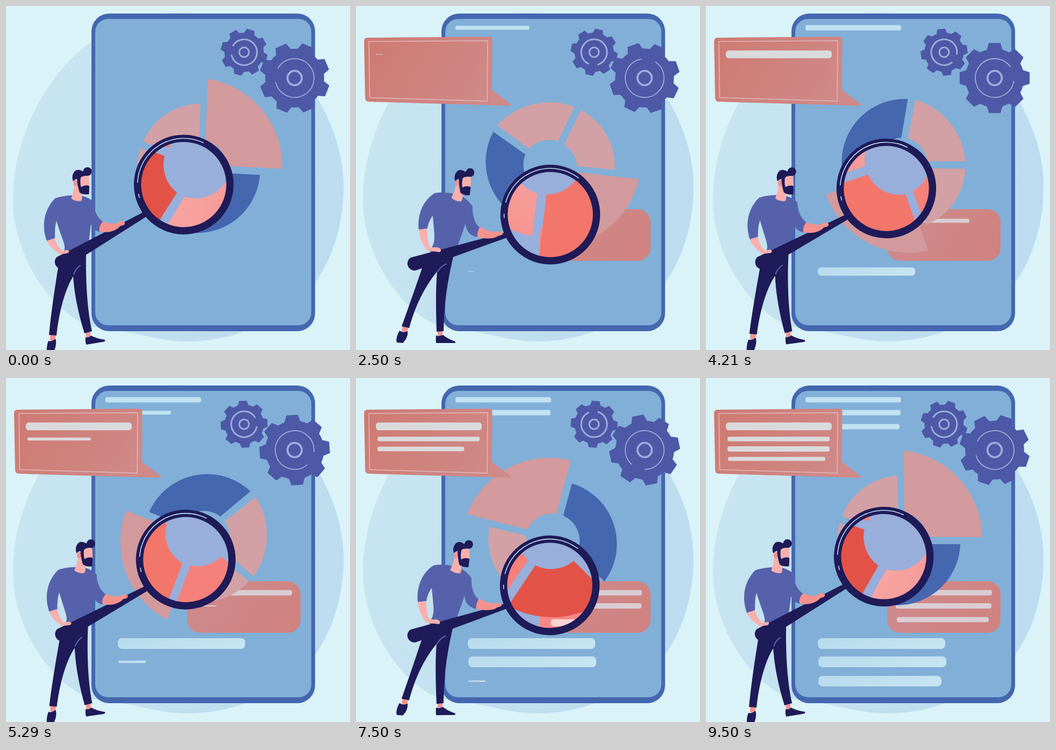
An HTML page that plays this animation: 640 by 640 pixels, repeating every 9.57 s.

```html
<!DOCTYPE html>
<html>
<head>
<meta charset="utf-8">
<style>
  html, body { margin: 0; width: 100%; height: 100%; overflow: hidden; background: #d9f3f8; }
  svg { display: block; width: 100%; height: 100%; }
</style>
</head>
<body>
<svg id="stage" viewBox="0 0 640 640"></svg>
<script>
const LOOP = 9570, GROWN = 2380, REST = LOOP - GROWN;
const NAVY = '#1f1a58', SWEATER = '#5562ab', SKIN = '#f9b0ad', ROSE = '#f5928d', RING = '#9aaedb', GEAR = '#4d58a7';
const ZOOM = 1.286, REACH = 268.4;
const stage = document.getElementById('stage');

const polar = (deg, r) => {
  const a = deg * Math.PI / 180;
  return `${(r * Math.cos(a)).toFixed(2)} ${(r * Math.sin(a)).toFixed(2)}`;
};
const clamp = v => Math.max(0, Math.min(1, v));
const arc = (from, to, r) => `M${polar(from, r)}A${r} ${r} 0 ${to - from > 180 ? 1 : 0} 1 ${polar(to, r)}`;
const path = (d, fill, extra = '') => `<path d="${d}" fill="${fill}" ${extra}/>`;
const line = (d, stroke, width) => path(d, 'none', `stroke="${stroke}" stroke-width="${width}" stroke-linecap="round"`);
const gradient = (id, a, b) => `<linearGradient id="${id}" x2="1" y2=".3">
  <stop stop-color="${a}"/><stop offset="1" stop-color="${b}"/></linearGradient>`;

// A bar that grows evenly from the middle of its left end
const bar = (x, y, w, h, fill, start, span) =>
  `<g class="bar" data-x="${x}" data-y="${y}" data-start="${start}" data-span="${span}">
  <rect y="${-h / 2}" width="${w}" height="${h}" rx="${h * .38}" fill="${fill}"/></g>`;

// Ring slices: outer start, outer end, inner end, inner start as [angle, radius], then both arc radii
const slices = [
  [[-86, 164], [1.5, 150], [-1.5, 47], [-81.5, 48], 164, 49],
  [[8, 109.5], [116.8, 126.5], [111, 54], [14.5, 48], 117.5, 51],
  [[123.2, 127], [196.8, 119], [189.8, 49], [124.3, 54], 130, 51],
  [[-156.7, 118.5], [-91.3, 117.5], [-95.5, 47], [-154.6, 47], 118, 48]
];
const chart = colors => `<g class="chart">` + slices.map(([a, b, c, d, outer, inner], i) =>
  path(`M${polar(...a)}A${outer} ${outer} 0 0 1 ${polar(...b)}L${polar(...c)}A${inner} ${inner} 0 0 0 ${polar(...d)}Z`, colors[i])
).join('') + `</g>`;

const card = (fill, barFill) => `<g class="card"><rect width="211" height="96" rx="24" fill="${fill}"/></g>` +
  [[353, 399.5, 179], [353, 424, 178], [355, 449.5, 176]].map(([x, y, w], i) =>
    bar(x, y, w, 10, barFill, GROWN + i * REST / 3, REST / 3)).join('');

function gear(id, x, y, r, phase, ringR, ringW, hubR, hubW) {
  const base = r * .83;
  let d = '';
  for (let i = 0; i < 8; i++) {
    const a = phase + i * 45;
    d += `${i ? `A${base} ${base} 0 0 1 ` : 'M'}${polar(a - 15.5, base)}L${polar(a - 9.3, r)}L${polar(a + 9.3, r)}L${polar(a + 15.5, base)}`;
  }
  return `<g transform="translate(${x} ${y})"><g id="${id}">` + path(d + 'Z', GEAR) +
    line(arc(-149, 166, ringR), RING, ringW) + `</g>
    <circle r="${hubR}" fill="none" stroke="${RING}" stroke-width="${hubW}"/></g>`;
}

// Parts of the figure in its upright and leaning pose
const limbs = [];
function limb(upright, leaning, fill, stroke) {
  limbs.push([upright, leaning]);
  return stroke ? `<path class="limb" fill="none" stroke="${stroke}" stroke-width="2.2" stroke-linecap="round"/>`
    : `<path class="limb" fill="${fill}"/>`;
}

const lower =
  limb('M82 610L93 611L91 622Q86 625 82 621Z', 'M87 594L98 596L95 606Q89 608 85 604Z', ROSE) +
  limb('M148 605L157 604L157 616Q152 619 149 615Z', 'M152 603L161 603L161 613Q156 615 152 612Z', ROSE) +
  limb('M79 623Q85 625 92 619Q95 628 90 641L90 646L76 646Q75 632 79 623Z',
       'M81 604Q88 609 96 605Q97 613 92 621L87 627L76 626Q73 618 81 604Z', NAVY) +
  limb('M148 616Q154 618 158 613Q166 618 184 621Q186 624 180 625L149 630Q147 623 148 616Z',
       'M149 613Q155 615 162 612Q170 619 184 624Q187 627 183 627L149 627Q148 620 149 613Z', NAVY) +
  limb('M98 480C90 530 84 570 80 612L94 613C98 575 108 530 125 503C127 535 134 570 146 609L160 605C152 570 148 520 149 462L120 458Z',
       'M125 482C112 520 98 560 85 596L99 599C108 565 125 525 151 494C148 530 149 570 150 606L163 605C164 560 168 520 182 463L150 455Z', NAVY) +
  limb('M126 499Q130 488 138 483', 'M152 494Q159 483 168 480', '', SWEATER) +
  limb('M91 358C104 353 120 352 130 352C145 352 157 358 163 365C163 380 170 394 180 401L174 420C166 418 160 414 158 406L154 440L112 470L107 458C113 446 106 440 94 400C91 408 91 420 91 432L76 437C66 410 70 380 91 358Z',
       'M147 348C160 346 173 347 185 350C197 352 209 361 217 372C217 390 221 406 231 412L226 430C215 428 205 421 204 405L189 447L146 466L137 455C150 440 146 428 143 390C137 399 134 406 133 414L117 416C114 390 124 362 147 348Z', SWEATER);

const hands =
  limb('M76 437L91 432C93 443 99 450 104 455L115 454Q120 457 114 460L100 462C88 453 80 446 76 437Z',
       'M117 416L133 414C132 428 134 441 138 449L152 449Q162 453 156 458L133 455C122 442 118 428 117 416Z', SKIN) +
  limb('M180 401C188 404 198 406 207 404L213 400Q222 400 221 405Q219 409 213 409C206 417 192 424 174 419Q172 410 180 401Z',
       'M231 411C239 416 250 420 260 420L268 419Q274 421 273 425Q270 427 264 428C260 433 240 434 226 430Q225 420 231 411Z', ROSE);

const head = `<g id="head">` +
  path('M127 334C127 342 124 350 121 358Q129 364 139 363Q143 361 141 346L138 330Z', SKIN) +
  path('M137 319L154 315L155 337L145 341L138 334Z', SKIN) +
  path('M125 326C121 315 126 306 134 305C139 304 142 309 145 307L156 314C148 317 141 315 138 321Q131 320 125 326Z', NAVY) +
  `<circle cx="133" cy="311.5" r="6.5" fill="${NAVY}"/><circle cx="151.5" cy="308" r="8" fill="${NAVY}"/>
  <ellipse cx="129.5" cy="329.5" rx="4" ry="6" fill="${ROSE}"/>` +
  path('M132 318L139 317C138 325 138 332 140 337C145 333 152 333 155 335L154.500 350Q144 352 137 347C134 338 132 328 132 318Z', NAVY) +
  `</g>`;

const lens = `<clipPath id="glass"><circle class="tool" cx="${REACH}" r="80"/></clipPath>
  <g clip-path="url(#glass)"><rect width="640" height="640" fill="#98aedb"/>
    <g transform="translate(-91.4 -89.8) scale(${ZOOM})">${card('#f58a85', '#fbd5d3')}</g>
    <g transform="translate(-110.9 -94.5) scale(${ZOOM})">${chart(['#f3766b', 'url(#pink)', '#e35247', '#f5817a'])}</g>
  </g>
  <g class="tool">${path('M177 3L-3 -12.700A13 13 0 0 0 0 13L177 13Z', NAVY)}
    <g transform="translate(${REACH} 0)">
      <circle r="86" fill="none" stroke="${NAVY}" stroke-width="13.500"/>
      ${line(arc(215, 327.5, 86), '#bfe0f2', 1.6)}${line(arc(196, 200.5, 86), '#bfe0f2', 1.6)}
    </g></g>`;

const bubble = `<g id="bubble">` +
  path('M22 59L247 57Q253.500 57 253.500 63L253 156L288 183Q289 186 284 185.500L24 178Q17 178 17 171L15 66Q15 58.500 22 59Z', 'url(#clay)') +
  line('M24 66L245 64.500L244 177L25.500 170.500Z', '#e0babc', 1.5) +
  [[37, 90, 197, 14.5], [40, 113.5, 190, 8.5], [40, 132, 190, 10], [41, 150.5, 188, 8]].map(([x, y, w, h], i) =>
    bar(x, y, w, h, '#dadadc', GROWN + i * REST / 4, REST / 4)).join('') + `</g>`;

stage.innerHTML = `<defs>${gradient('air', '#c9e6f1', '#bddcef')}${gradient('clay', '#cf7972', '#cf8987')}
  ${gradient('blush', '#cd8b8e', '#d08380')}${gradient('pink', '#f8aba8', '#f5938f')}${gradient('ice', '#b7daee', '#c6e4f1')}</defs>` +
  path('M320 13C500 13 628 190 628 335C628 420 600 480 575 515C530 570 470 600 445 605C410 618 370 625 330 624C275 622 240 605 160 597C90 575 13 470 13 360C13 240 80 120 160 66C210 30 260 13 320 13Z', 'url(#air)') +
  `<rect x="159" y="14" width="416" height="591" rx="33" fill="#4567af"/>
  <rect x="166" y="24" width="402" height="570" rx="24" fill="#81afd8"/>` +
  [[40.5, 178, 0], [64.5, 177, 3060], [90.5, 177, 6300]].map(([y, w, start]) => bar(185, y, w, 10, '#c0e2f1', start, 3240)).join('') +
  [[208, 494, 237], [209, 528, 238], [209, 564, 236]].map(([x, y, w], i) =>
    bar(x, y, w, 20, 'url(#ice)', GROWN + i * REST / 3, REST / 3)).join('') +
  gear('smallGear', 443, 86, 44, -74, 24, 3, 9, 3) +
  gear('bigGear', 537, 134, 66, -68.4, 36, 1.8, 13.3, 3.8) +
  card('url(#blush)', '#d9ced4') + chart(['#d29a9d', '#4567af', '#d2a0a4', '#d2a1a5']) +
  bubble + lower + lens + hands + head;

const all = selector => [...stage.querySelectorAll(selector)];
const byId = id => document.getElementById(id);
const place = (el, value) => el.setAttribute('transform', value);
const bars = all('.bar'), charts = all('.chart'), cards = all('.card'), tools = all('.tool'), limbPaths = all('.limb');
const bigGear = byId('bigGear'), smallGear = byId('smallGear'), bubbleGroup = byId('bubble'), headGroup = byId('head');

function morph(from, to, p) {
  const targets = to.match(/[\d.]+/g);
  let i = 0;
  return from.replace(/[\d.]+/g, n => (+n + (targets[i++] - n) * p).toFixed(2));
}

function draw(t) {
  const turn = 360 * t / LOOP;
  const lean = (1 - Math.cos(4 * Math.PI * t / LOOP)) / 2;
  const grow = clamp(t / GROWN);
  const pop = 1 - (1 - grow) ** 2.85;

  place(bigGear, `rotate(${turn})`);
  place(smallGear, `rotate(${-turn})`);
  charts.forEach(el => place(el, `translate(364 299) rotate(${turn})`));
  cards.forEach(el => place(el, `translate(337 378) scale(${grow})`));
  place(bubbleGroup, `translate(288 185) scale(${pop}) translate(-288 -185)`);
  bars.forEach(el => {
    const { x, y, start, span } = el.dataset;
    place(el, `translate(${x} ${y}) scale(${clamp((t - start) / span)})`);
  });

  tools.forEach(el => place(el, `translate(${104 + 5 * lean} ${476 + 3 * lean}) rotate(${-32.4 + 12.65 * lean})`));
  limbPaths.forEach((el, i) => el.setAttribute('d', morph(...limbs[i], lean)));
  place(headGroup, `translate(${57 * lean} 0) rotate(${5 * lean} 133 355)`);
}

const begin = performance.now();
function tick() {
  draw((performance.now() - begin) % LOOP);
  requestAnimationFrame(tick);
}
tick();
</script>
</body>
</html>
```
